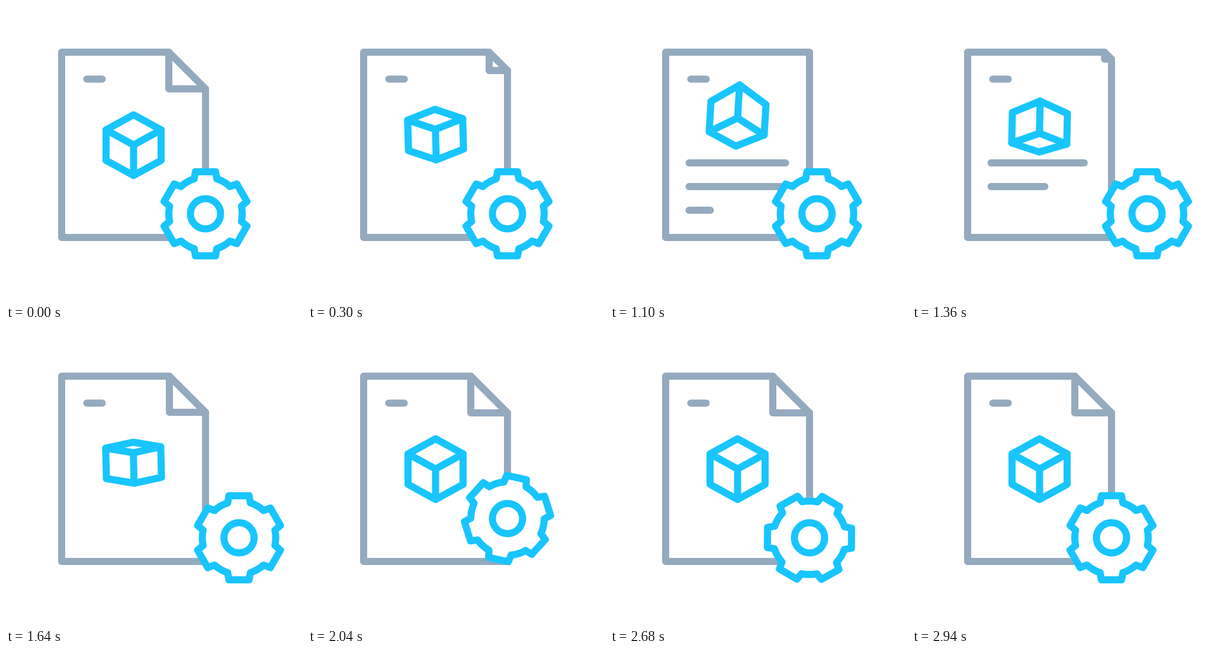
Write an HTML page with a canvas that moves like this. It is 500 px wide and 500 px high and loops after 3000 ms.

```html
<!DOCTYPE html>
<html lang="en">
<head>
<meta charset="utf-8">
<title>Document and gear</title>
<style>
html, body { margin: 0; width: 100%; height: 100%; overflow: hidden; background: #fff; }
canvas { display: block; width: 500px; height: 500px; }
</style>
</head>
<body>
<canvas id="stage" width="500" height="500"></canvas>
<script>
const ctx = document.getElementById('stage').getContext('2d');
const LOOP = 3000, STEP = 20;
const GREY = '#94aabf', BLUE = '#18c5ff';

const smooth = u => u * u * (3 - 2 * u);
const span = (t, a, b) => Math.min(1, Math.max(0, (t - a) / (b - a)));
const ease = (t, a, b) => smooth(span(t, a, b));

// Rises over a..b, falls back over c..d
const pulse = (t, a, b, c, d) => ease(t, a, b) - ease(t, c, d);

// Eased interpolation through [time, value] pairs
function track(t, keys) {
  let v = keys[0][1];
  for (let i = 1; i < keys.length; i++) {
    v += (keys[i][1] - keys[i - 1][1]) * ease(t, keys[i - 1][0], keys[i][0]);
  }
  return v;
}

function path(points, closed) {
  ctx.beginPath();
  points.forEach(([x, y]) => ctx.lineTo(x, y));
  if (closed) ctx.closePath();
  ctx.stroke();
}

function drawPage(t) {
  ctx.strokeStyle = GREY;
  const fold = 62 * (1 - pulse(t, 100, 500, 1240, 1672));
  const x = 337 - fold, y = 78 + fold;
  path([[94, 78], [x, 78], [337, y], [337, 391], [94, 391]], true);
  if (fold > 0.3) path([[x, 78], [x, y], [337, y]]);
}

function drawText(t) {
  ctx.strokeStyle = GREY;
  const line = (x, y, width, grow) => {
    if (grow > 0.002) path([[x, y], [x + width * grow, y]]);
  };
  line(136.5, 123.5, 26, 1);
  line(133.5, 265, 163, pulse(t, 340, 666, 1330, 1600));
  line(133.5, 305, 163, pulse(t, 580, 860, 1240, 1500));
  line(133.5, 345, 36, pulse(t, 800, 1040, 1160, 1360));
}

function drawCube(t) {
  const w = 46.5, h = 25.75;
  const tilt = 25.5 - 51.5 * pulse(t, 100, 873, 1156, 1936);
  const lift = Math.min(0, tilt) * 0.17;
  const y = track(t, [[100, 235], [660, 174], [2000, 235]]);
  const roll = track(t, [[100, 0], [560, -3.8], [1100, 3.5], [1640, -1.4], [1936, 0]]);

  const upLeft = [-w, -h], upRight = [w, -h];
  const lowLeft = [-w, h], lowRight = [w, h];
  const top = [0, -h + tilt + lift], bottom = [0, h + tilt];

  ctx.save();
  ctx.translate(215.5, y);
  ctx.rotate(roll * Math.PI / 180);
  ctx.strokeStyle = BLUE;
  path([upLeft, top, upRight, lowRight, bottom, lowLeft], true);
  path([top, bottom]);
  if (tilt > 0) path([upLeft, [0, -h - tilt], upRight]);
  else path([lowLeft, [0, h - tilt + lift], lowRight]);
  ctx.restore();
}

function drawGear(t) {
  const rad = Math.PI / 180;
  const x = 337 + 60 * pulse(t, 1000, 1338, 1604, 1854);
  const y = 351 - 38 * pulse(t, 1850, 2100, 2100, 2430);
  const u = span(t, 1996, 2940);
  const turn = 360 * (0.7 * u + 0.3 * smooth(u));

  ctx.save();
  ctx.translate(x, y);
  ctx.rotate(turn * rad);
  ctx.strokeStyle = BLUE;
  ctx.fillStyle = '#fff';
  ctx.beginPath();
  for (let a = -90; a < 270; a += 60) {
    for (const d of [-13.5, 13.5]) {
      ctx.lineTo(73 * Math.cos((a + d) * rad), 73 * Math.sin((a + d) * rad));
    }
    ctx.arc(0, 0, 62, (a + 18) * rad, (a + 42) * rad);
  }
  ctx.closePath();
  ctx.fill();
  ctx.stroke();
  ctx.beginPath();
  ctx.arc(0, 0, 25.5, 0, 2 * Math.PI);
  ctx.stroke();
  ctx.restore();
}

function draw(t) {
  ctx.fillStyle = '#fff';
  ctx.fillRect(0, 0, 500, 500);
  ctx.lineWidth = 12;
  ctx.lineCap = ctx.lineJoin = 'round';
  drawPage(t);
  drawText(t);
  drawCube(t);
  drawGear(t);
}

const start = performance.now();
function frame() {
  const t = (performance.now() - start) % LOOP;
  draw(Math.floor(t / STEP) * STEP);
  requestAnimationFrame(frame);
}
frame();
</script>
</body>
</html>
```
